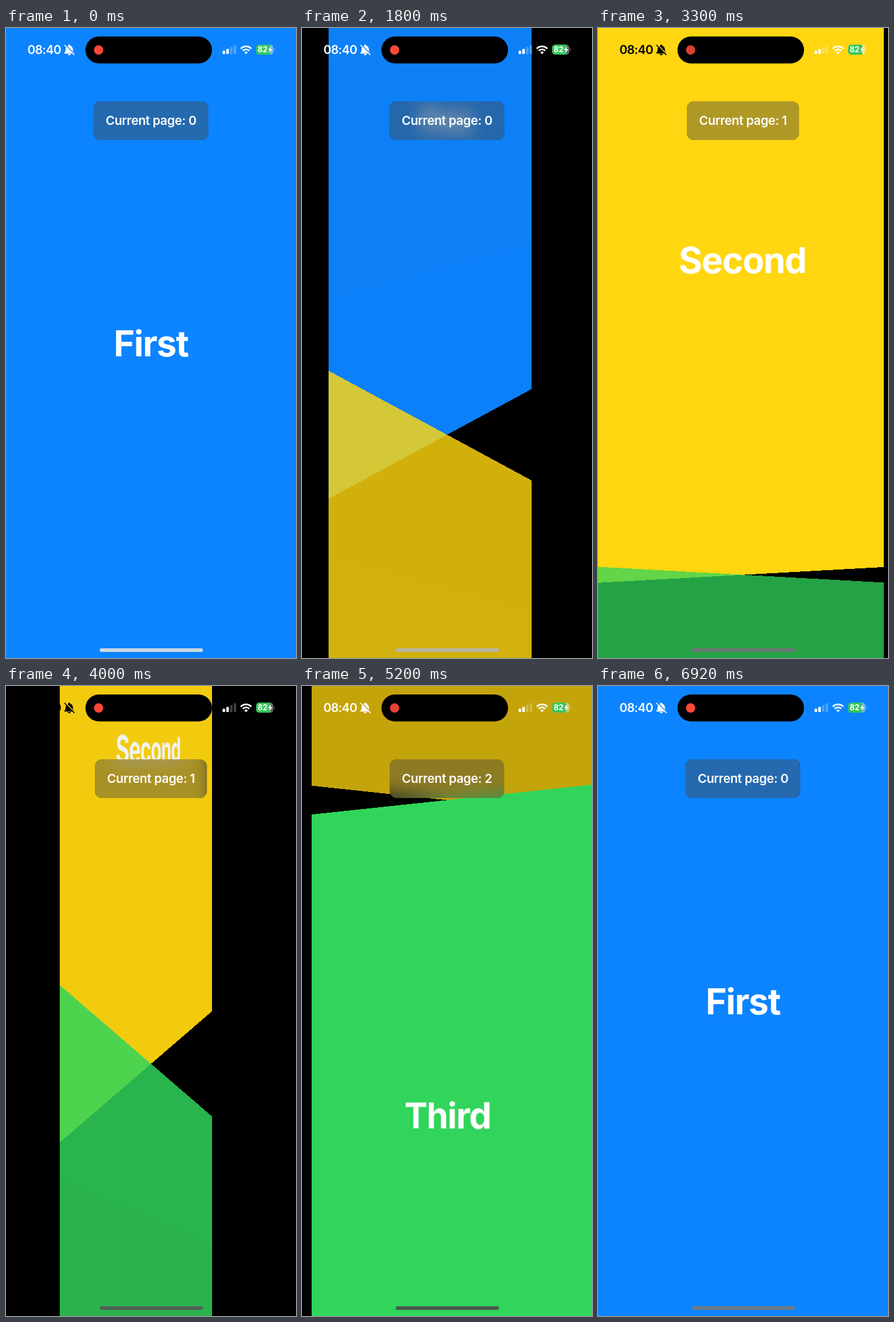
These frames come from a looping animation (480x1040 px, 7040 ms). An HTML page:

```html
<!DOCTYPE html>
<html lang="en">
<head>
<meta charset="utf-8">
<title>Vertical pager</title>
<style>
  html, body { margin: 0; width: 100%; height: 100%; overflow: hidden; background: #000; }
  body { position: relative; color: #fff; font-family: Inter, "Open Sans", sans-serif; }
  .page {
    position: absolute; left: 0; top: 0; width: 480px; height: 1040px;
    display: flex; align-items: center; justify-content: center;
    font-size: 59.5px; font-weight: 700; letter-spacing: -1.4px;
  }
  #badge {
    position: absolute; left: 50%; top: 121px; height: 63.5px; line-height: 64px;
    transform: translateX(-50%); padding: 0 20px; border-radius: 12px; white-space: nowrap;
    font-size: 20.5px; font-weight: 600; letter-spacing: -.37px;
    background: #000; overflow: hidden;
  }
  #glass {
    position: absolute; left: 50%; top: -121px; margin-left: -240px;
    width: 480px; height: 1040px; filter: blur(14px);
  }
  #tint { position: absolute; inset: 0; background: rgba(70, 70, 70, .43); }
  #label { position: relative; }
  svg { position: absolute; left: 0; top: 0; }
  #home {
    position: absolute; left: 155px; top: 1024px; width: 171px; height: 6px; border-radius: 3px;
  }
</style>
</head>
<body>
<div id="pages">
  <div class="page" style="background:#0d84ff">First</div>
  <div class="page" style="background:#ffd60f">Second</div>
  <div class="page" style="background:#31d55b">Third</div>
</div>
<div id="badge"><div id="glass"></div><div id="tint"></div><span id="label"></span></div>

<svg width="480" height="70" fill="#fff">
  <mask id="cut">
    <path d="M94 24h22v24h-22z" fill="#fff"/>
    <path d="M97.6 27.2l17 17" stroke="#000" stroke-width="2"/>
  </mask>
  <g id="clock">
    <text x="35.5" y="43" font-size="20" font-weight="600" letter-spacing="-.7">08:40</text>
    <path mask="url(#cut)" d="M104.7 27.5c-1 0-1.7.7-1.7 1.7-3 1-4.3 3.4-4.3 6.300 0 3-.8 4-2 5.200-.6.7-.3 1.500.6 1.500h14.800c.9 0 1.200-.8.6-1.500-1.200-1.200-2-2.200-2-5.200 0-2.900-1.300-5.300-4.300-6.300 0-1-.7-1.700-1.700-1.700zM102 43h5.400c-.3 1.300-1.300 2-2.700 2s-2.400-.7-2.700-2z"/>
    <path d="M97 28.2l15.800 15.9" fill="none" stroke="currentColor" stroke-width="1.5" stroke-linecap="round"/>
  </g>
  <rect x="131.500" y="14" width="209.500" height="44.500" rx="22.200" fill="#000"/>
  <circle id="dot" cx="153.300" cy="36.200" r="7.700" fill="#ff4a3a"/>
  <g id="signal"></g>
  <path d="M388.600 34.200a12 12 0 0 1 17.400 0M391.800 37.600a7.600 7.600 0 0 1 11 0" fill="none" stroke="#fff" stroke-width="2.700"/>
  <path d="M397.300 43.300l-3-3.100a4.300 4.300 0 0 1 6 0z"/>
  <rect x="414" y="27.500" width="28.500" height="16.500" rx="5" opacity=".4"/>
  <path d="M419 27.500h18.500v16.500h-18.500a5 5 0 0 1-5-5v-6.500a5 5 0 0 1 5-5z" fill="#34c759"/>
  <path d="M443.600 33.500c1.800.7 1.800 4 0 4.700z" opacity=".45"/>
  <text x="416.600" y="40.400" font-size="13" font-weight="700" letter-spacing="-.3">82</text>
  <path d="M438.700 30.200l-5 6.300h3.200l-1.200 4.900 5.300-6.500h-3.300z"/>
</svg>
<div id="home"></div>

<script>
const LOOP = 7040, STEP = 100, HEIGHT = 1040, SETTLE = 116;
const [stage, glass, label, clock, dot, signal, home] =
  ['pages', 'glass', 'label', 'clock', 'dot', 'signal', 'home'].map(id => document.getElementById(id));
glass.innerHTML = stage.innerHTML;
signal.innerHTML = [0, 1, 2, 3].map(i =>
  `<rect x="${358.5 + 6.1 * i}" y="${37.5 - 3 * i}" width="4.2" height="${5.5 + 3 * i}" rx="1" opacity="${i < 2 ? 1 : .25}"/>`).join('');

// Each swipe drags by `pull` pages until `release`, then settles on page `to`.
const swipes = [
  { start: 500, release: 1900, from: 0, pull: .399, to: 1 },
  { start: 2600, release: 4100, from: 1, pull: .447, to: 2 },
  { start: 4900, release: 5300, from: 2, pull: -.287, to: 1 },
  { start: 5600, release: 5700, from: 1, pull: -.209, to: 0 }
];

function scrollAt(t) {
  const swipe = swipes.findLast(s => t >= s.start);
  if (!swipe) return 0;
  const { start, release, from, pull, to } = swipe;
  if (t < release) return from + pull * ((t - start) / (release - start)) ** 1.6;
  return to + (from + pull - to) * Math.exp((release - t) / SETTLE);
}

// cubic-bezier(.42, 0, .58, 1)
function easeInOut(x) {
  let lo = 0, hi = 1, u;
  for (let i = 0; i < 24; i++) {
    u = (lo + hi) / 2;
    const at = 1.26 * u * (1 - u) ** 2 + 1.74 * u * u * (1 - u) + u ** 3;
    if (at < x) lo = u; else hi = u;
  }
  return u * u * (3 - 2 * u);
}

function placePage(page, offset) {
  const phase = easeInOut(Math.min(1, Math.abs(offset)));
  page.style.visibility = Math.abs(offset) < 1 ? 'visible' : 'hidden';
  page.style.opacity = 1 - .25 * (Math.max(0, phase - .2) / .8) ** .9;
  page.style.transform = `translateY(${offset * HEIGHT}px) perspective(${HEIGHT}px) rotateY(${-180 * Math.sign(offset) * phase}deg)`;
}

function draw(now) {
  const t = Math.floor(now % LOOP / STEP) * STEP;
  const position = scrollAt(t);
  for (const layer of [stage, glass])
    [...layer.children].forEach((page, i) => placePage(page, i - position));
  label.textContent = `Current page: ${Math.round(position)}`;

  // The clock darkens while the yellow page is behind it.
  const dark = t >= 2500 && t < 4700 || t >= 5500 && t < 6100;
  clock.style.color = clock.style.fill = dark ? '#000' : '#fff';
  dot.style.opacity = .93 + .07 * Math.cos(2 * Math.PI * (t / 1000 - .87));
  const gray = 150 + 75 * Math.cos(Math.PI * t / 5000);
  home.style.background = `rgba(${gray}, ${gray}, ${gray}, .9)`;
  requestAnimationFrame(draw);
}
requestAnimationFrame(draw);
</script>
</body>
</html>
```
